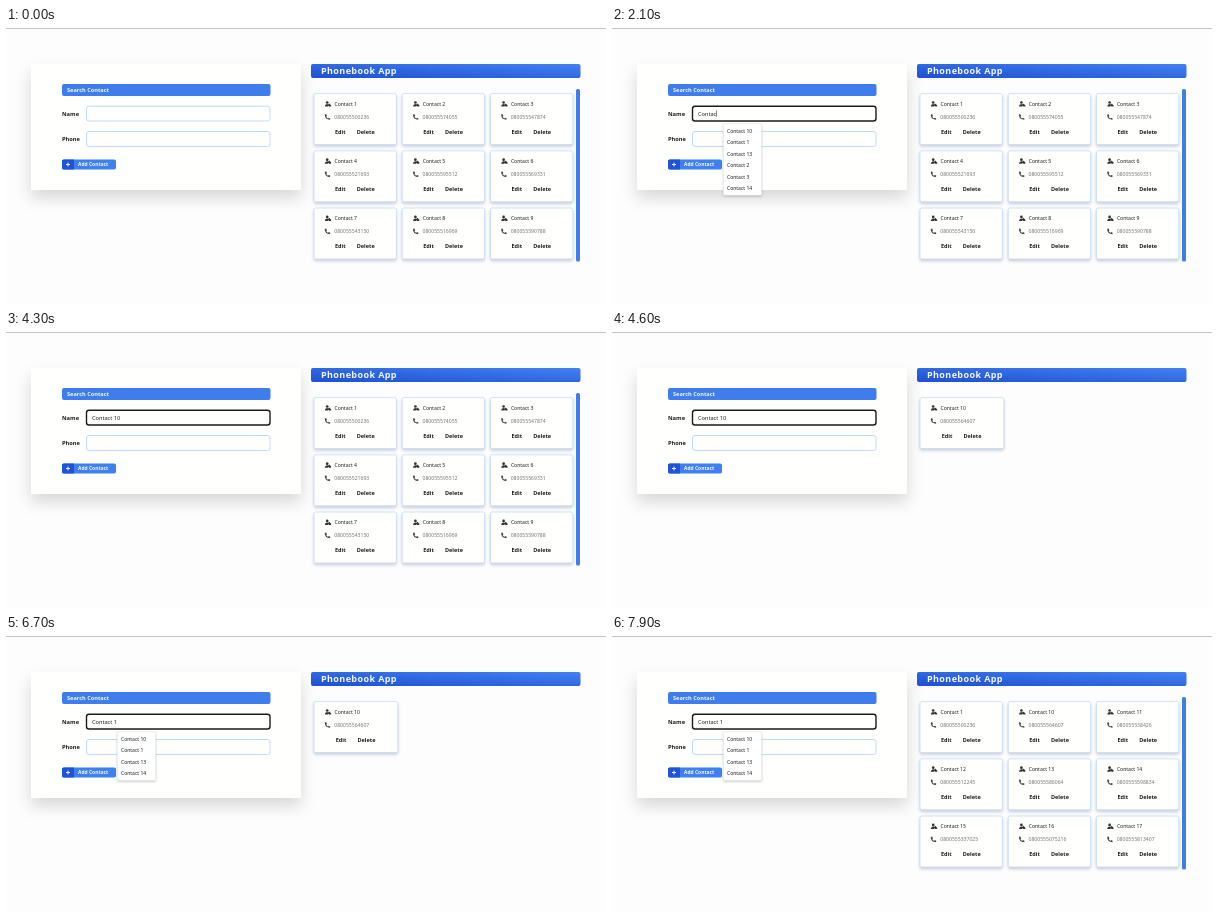
Write an HTML page that moves like this. It is 600 by 276 pixels and loops after 8000 ms.

```html
<!DOCTYPE html>
<html lang="en">
<head>
<meta charset="utf-8">
<title>Phonebook App</title>
<style>
  html, body { margin: 0; width: 100%; height: 100%; overflow: hidden; background: #fdfdfe; }
  svg { display: block; width: 100vw; height: 100vh; }
  text { font-family: "Noto Sans", "Open Sans", sans-serif; fill: #1c1c1c; white-space: pre; }
  .bold { font-weight: 700; }
  .light { fill: #f3f7ff; }
  .panel { fill: #fffffe; filter: drop-shadow(0 8px 8px rgba(0, 0, 0, .15)); }
  .card { fill: #fffffe; stroke: #c3dcf8; stroke-width: .8; filter: drop-shadow(0 2px 1.6px rgba(30, 50, 80, .22)); }
  .menu { fill: #fff; stroke: #e3e3e3; stroke-width: .5; filter: drop-shadow(0 1px 1.2px rgba(0, 0, 0, .22)); }
  .field { fill: #fffffe; stroke: #bcdcfa; stroke-width: 1; }
  .focused { stroke: #1b1b1b; stroke-width: 1.4; }
</style>
</head>
<body>
<svg viewBox="0 0 600 276">
  <defs>
    <linearGradient id="banner" x1="0" y1="1" x2="1" y2="0">
      <stop stop-color="#1e50d2"/><stop offset="1" stop-color="#4182f0"/>
    </linearGradient>
  </defs>
  <rect width="600" height="1" fill="#c4c4c4"/>
  <rect class="panel" x="25" y="36" width="270" height="126"/>
  <rect x="56" y="56" width="208.5" height="12" rx="2" fill="#3f7dec"/>
  <text class="bold light" x="61" y="64.2" font-size="5.6">Search Contact</text>
  <text class="bold" x="56" y="87.7" font-size="5.7">Name</text>
  <text class="bold" x="56" y="113.2" font-size="5.7">Phone</text>
  <rect class="field" x="80.5" y="103.5" width="183.5" height="15" rx="2.5"/>
  <rect x="56" y="131.5" width="54" height="10" rx="1.8" fill="#3f80f0"/>
  <path d="M68 131.5H57.8Q56 131.5 56 133.3V139.7Q56 141.5 57.8 141.5H68Z" fill="#1f53d6"/>
  <path d="M60 136.5h4M62 134.5v4" stroke="#fff" stroke-width=".9"/>
  <text class="bold light" x="72" y="138.3" font-size="4.95">Add Contact</text>
  <rect x="305" y="36" width="269.5" height="14" rx="2" fill="url(#banner)"/>
  <text class="bold light" x="315" y="46.4" font-size="9" letter-spacing=".4">Phonebook App</text>
  <g id="live"></g>
</svg>
<script>
const LOOP = 8000;
const live = document.getElementById('live');
const pen = document.createElement('canvas').getContext('2d');
pen.font = '5.6px "Noto Sans", "Open Sans", sans-serif';

const contacts = (...ids) => ids.map(id => 'Contact ' + id);
const recent = ['Contact 10', 'Budi', 'Contact 1', 'Contact 13', 'Edo', 'Uma'];
const matches = contacts(10, 1, 13, 2, 3, 14);
const narrowed = contacts(10, 1, 13, 14);

// Each track lists [start time, value] pairs.
const typed = [
  [0, ''], [1400, 'C'], [1700, 'Co'], [1800, 'Con'], [1900, 'Cont'], [2000, 'Conta'],
  [2100, 'Contac'], [2200, 'Contact'], [2400, 'Contact '], [3500, 'Contact 1'],
  [3700, 'Contact 10'], [6100, 'Contact 1']
];
const suggestions = [
  [0, []], [1100, recent], [1400, matches], [3500, narrowed],
  [3700, contacts(10)], [3900, []], [6200, narrowed]
];
const caret = [
  [0, false], [800, true], [2700, false], [3000, true], [4300, false], [4900, true],
  [5500, false], [6100, true], [6700, false], [7300, true], [7800, false]
];
const results = [
  [0, [1, 2, 3, 4, 5, 6, 7, 8, 9]],
  [4600, [10]],
  [6800, [1, 10, 11, 12, 13, 14, 15, 16, 17]]
];

const at = (track, t) => track.findLast(([start]) => start <= t)[1];

const text = (x, y, size, label, attrs = '') =>
  `<text x="${x}" y="${y}" font-size="${size}" ${attrs}>${label}</text>`;

function phoneNumber(id) {
  const tail = String((id * 73819 + 26417) % 100000).padStart(5, '0');
  return '0800555' + tail + (id >= 14 ? id % 10 : '');
}

function card(id, index, width) {
  const x = index % 3 * 88.2, y = Math.floor(index / 3) * 57.2;
  const middle = 308 + width / 2;
  return `<g transform="translate(${x} ${y})">
    <rect class="card" x="308" y="65.6" width="${width}" height="51" rx="1.8"/>
    <circle cx="321.2" cy="74.5" r="1.35" fill="#333"/>
    <path d="M318.8 78.6Q319 76 321 76L322.4 76.4L323.3 75.4L325.3 77.6L325 78.6H323.2L322.5 77.8L321.8 78.6Z" fill="#333"/>
    <path d="M318.7 86.6L320.2 86.2L321 88L320.2 88.7Q320.8 90 322 90.5L322.7 89.7L324.3 90.4L324 91.8Q319 91.8 318.7 86.6Z" fill="#444"/>
    ${text(328.5, 78, 5.05, 'Contact ' + id)}
    ${text(328.3, 90.6, 5.1, phoneNumber(id), 'style="fill:#777"')}
    ${text(middle - 20.2, 106, 5.5, 'Edit', 'class="bold"')}
    ${text(middle + 1.6, 106, 5.5, 'Delete', 'class="bold"')}
  </g>`;
}

function menu(items) {
  if (!items.length) return '';
  const rows = items.map((item, i) => text(115, 104.9 + i * 11.4, 5, item)).join('');
  return `<rect class="menu" x="111.3" y="96" width="38.4" height="${items.length * 11.4 + 2.8}" rx="1"/>` + rows;
}

function scene(t) {
  const value = at(typed, t), ids = at(results, t);
  const full = ids.length > 3;
  const caretX = 86.2 + pen.measureText(value).width;
  return `<rect class="field ${t >= 800 ? 'focused' : ''}" x="80.5" y="78.2" width="183.5" height="14.8" rx="2.5"/>`
    + text(86, 87.7, 5.6, value)
    + (at(caret, t) ? `<rect x="${caretX}" y="82.3" width=".6" height="6.5" fill="#333"/>` : '')
    + ids.map((id, i) => card(id, i, full ? 82.4 : 83.8)).join('')
    + (full ? '<rect x="570" y="61" width="4" height="172.5" rx="1.5" fill="#3f7dec"/>' : '')
    + menu(at(suggestions, t));
}

let shown = '';
function draw() {
  const markup = scene(performance.now() % LOOP);
  if (markup !== shown) live.innerHTML = shown = markup;
  requestAnimationFrame(draw);
}
draw();
</script>
</body>
</html>
```
